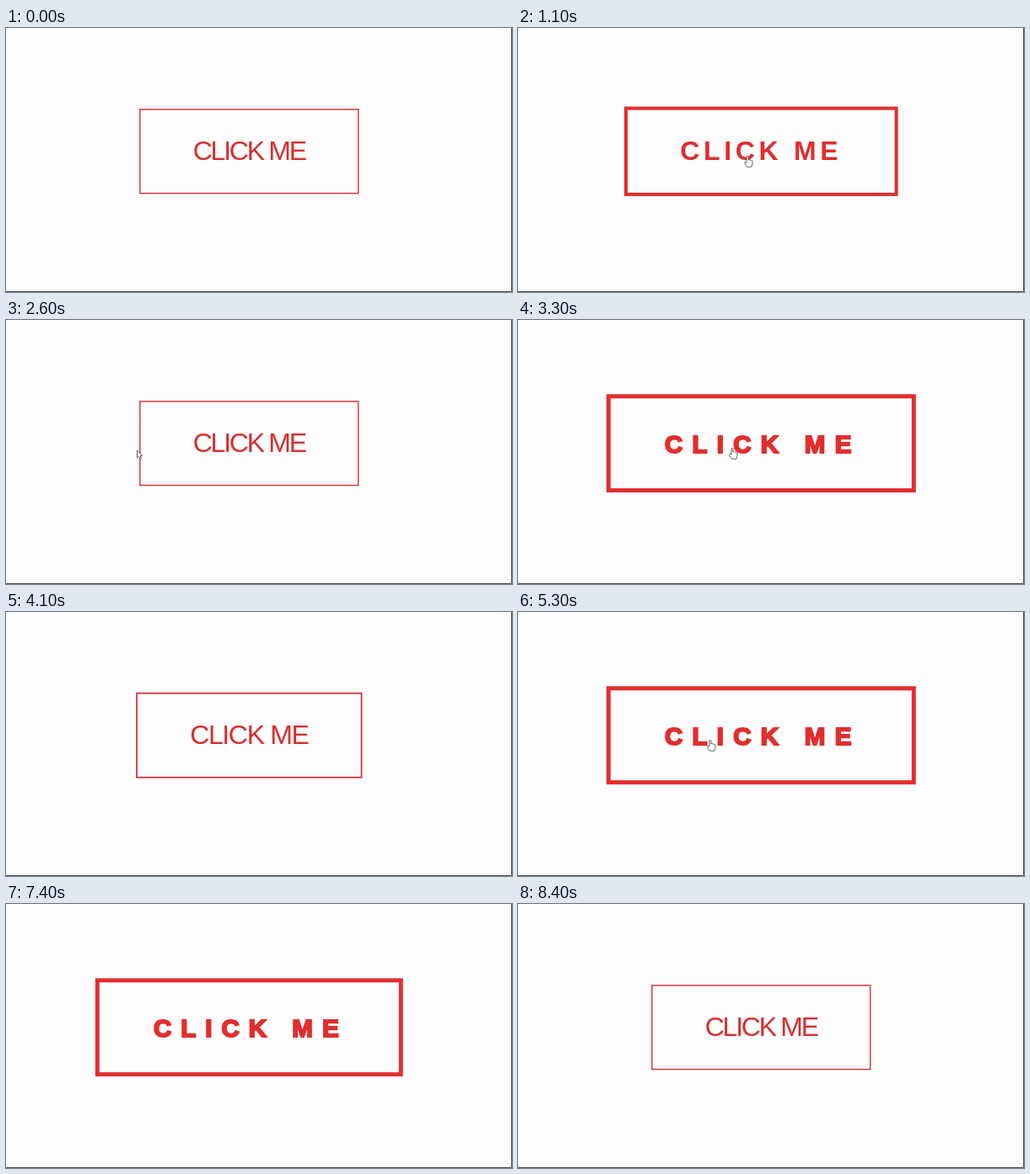
An HTML page for the animation above (8500 ms loop, 600 by 314 pixels).

```html
<!DOCTYPE html>
<html lang="en">
<head>
<meta charset="utf-8">
<title>Button hover</title>
<style>
  html, body { margin: 0; width: 100%; height: 100%; overflow: hidden; background: #fdfcfe; }
  svg { display: block; width: 600px; height: 314px; }
  text { font-family: "Liberation Sans", Arial, sans-serif; white-space: pre; }
  #button { fill: currentColor; stroke: currentColor; }
  #frame { fill: none; }
  .cursor { fill: #fff; stroke: #4a4a4a; stroke-width: .85; stroke-linejoin: round; }
</style>
</head>
<body>
<svg viewBox="0 0 600 314">
  <path d="M0 313.5H599.5V0" fill="none" stroke="#4c4c4c"/>
  <g id="button">
    <rect id="frame"/>
    <text id="label">CLICK ME</text>
  </g>
  <path id="arrow" class="cursor" d="M.5.5V9.6L2.6 7.7 4.1 10.8 5.5 10.1 4.1 7.1H6.9Z"/>
  <path id="hand" class="cursor" d="M-1 8V1.2Q-.9.3 0 .3T1 1.2V4.6Q2 4 2.9 5 4 4.5 4.7 5.6 6 5.4 6 6.8V9.6L4.9 13.2H-.6L-3.4 8.8Q-3.6 7.3-2.4 7.3Z"/>
</svg>
<script>
const LOOP = 8500, STEP = 100, FADE = 700;
const CX = 288.3, CY = 146.7, PAD_X = 62.2, PAD_Y = 30.8;
const EDGE = 158, SPEED = 2, TRAVEL = 250;

// each visit: first and last time seen, when the hover ends, and where the pointer goes
const visits = [
  { first: 600, last: 1900, off: 1750, from: 51, rest: 272, to: 30 },
  { first: 2600, last: 3600, off: 3550, from: 155, rest: 254, to: 35 },
  { first: 4400, last: 5700, off: 5650, from: 67, rest: 228, to: 1 },
  { first: 6500, last: 7300, off: 7320, from: 162, rest: 250, to: 62 }
];
for (const v of visits) v.on = v.first + Math.max(1, (EDGE - v.from) / SPEED);

const $ = id => document.getElementById(id);
const set = (el, attrs) => { for (const k in attrs) el.setAttribute(k, attrs[k]); };
const mix = (a, b, p) => a + (b - a) * p;
const clamp = v => Math.min(1, Math.max(0, v));

// cubic-bezier(.42, 0, .58, 1)
function easeInOut(x) {
  let lo = 0, hi = 1;
  for (let i = 0; i < 24; i++) {
    const s = (lo + hi) / 2, r = 1 - s;
    if (1.26 * s * r * r + 1.74 * s * s * r + s ** 3 < x) lo = s; else hi = s;
  }
  return lo * lo * (3 - 2 * lo);
}

function progress(t) {
  const v = visits.filter(v => v.on <= t).pop();
  if (!v) return 0;
  const part = start => easeInOut(clamp((t - start) / FADE));
  return t < v.off ? part(v.on) : 1 - part(v.off);
}

function drawButton(p) {
  // the typeface jumps to bold and then to black as the weight grows
  const weight = mix(100, 900, p), bold = weight > 500, black = weight > 700;
  const size = black ? 29.5 : 32, gap = black ? 3.95 : 0;
  const spacing = mix(-2.25, 7.3, p) + gap;
  const advance = (bold ? 4.833 : 4.723) * size + 8 * spacing;
  const border = mix(1.4, 5, p);
  const w = advance + 2 * PAD_X + border;
  const h = (black ? 45.3 : 36.8) + 2 * PAD_Y + border;
  $("button").style.color = `rgb(${mix(214, 226, p)}, 46, 45)`;
  set($("frame"), { x: CX - w / 2, y: CY - h / 2, width: w, height: h, "stroke-width": border });
  set($("label"), {
    x: CX - advance / 2 + gap / 2, y: CY + (black ? 11.7 : 10.6),
    "font-size": size, "font-weight": bold ? 700 : 400,
    "letter-spacing": spacing, "stroke-width": black ? 2 : 0
  });
}

function drawPointer(t) {
  const v = visits.find(v => t >= v.first && t <= v.last);
  const over = v && t >= v.on && t < Math.min(v.off, v.last);
  set($("hand"), { visibility: over ? "visible" : "hidden" });
  set($("arrow"), { visibility: v && !over ? "visible" : "hidden" });
  if (!v) return;
  const come = 1 - (1 - clamp((t - v.first) / TRAVEL)) ** 2;
  const leave = clamp((t - v.last) / TRAVEL + 1);
  const x = mix(mix(v.from, v.rest, come), v.to, leave);
  const y = mix(mix(154.5, 152, come), 143, leave);
  set($(over ? "hand" : "arrow"), { transform: `translate(${x} ${y})` });
}

function draw(now) {
  const t = Math.floor((now % LOOP) / STEP) * STEP;
  drawButton(progress(t));
  drawPointer(t);
}

const start = performance.now();
function tick() {
  draw(performance.now() - start);
  requestAnimationFrame(tick);
}
tick();
</script>
</body>
</html>
```
